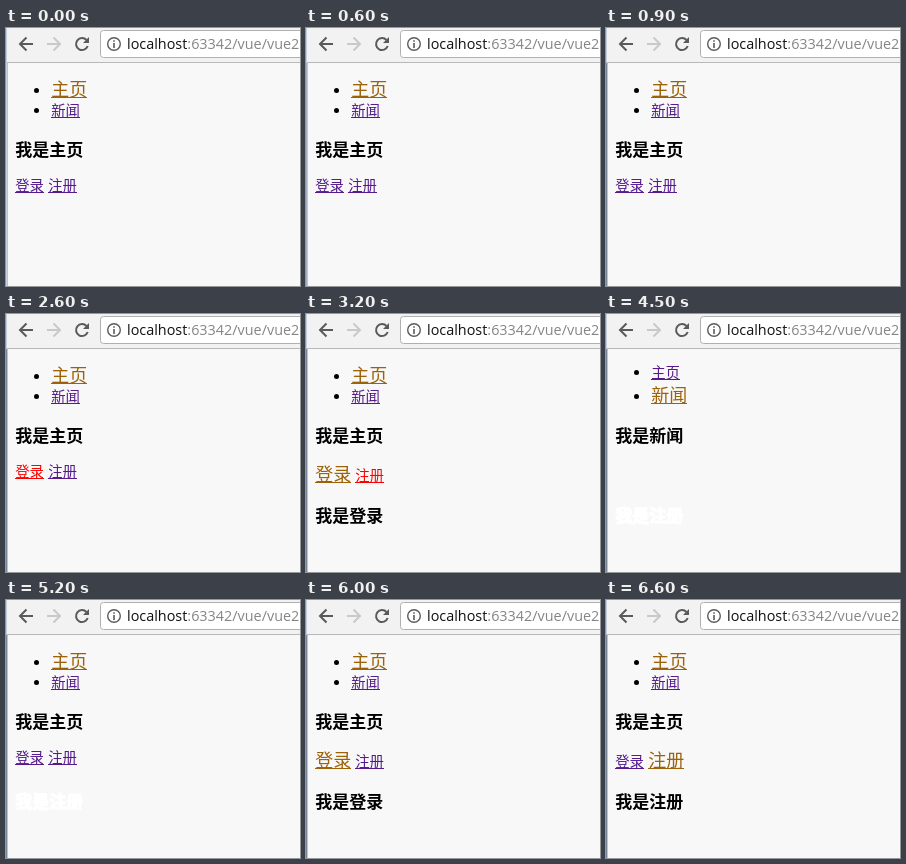
These frames come from a looping animation (294x258 px, 7.4 s). An HTML page:

```html
<!DOCTYPE html>
<html lang="zh-CN">
<head>
<meta charset="utf-8">
<title>主页</title>
<style>
  html, body { margin: 0; width: 100%; height: 100%; overflow: hidden; background: #f8f8f8; }
  svg { display: block; }
  text { font-family: "Noto Sans CJK SC", "Noto Sans CJK", sans-serif; }
  .url { font: 14.4px "Open Sans", "Noto Sans", sans-serif; fill: #858585; }
  .host { fill: #111; }
  .head { font-size: 17px; font-weight: 700; }
  .faded { fill: #fff; stroke: #fff; stroke-width: 1; }
  .icon { fill: none; stroke: #5a5a5a; stroke-width: 2; }
  .off { stroke: #c9c9c9; }
  .link { fill: #551a8b; font-size: 14.4px; font-weight: 350; }
  .hover { fill: #f00; }
  .active { fill: #9c6208; font-size: 18px; }
</style>
</head>
<body>
<svg width="294" height="258" viewBox="0 0 294 258">
  <rect width="294" height="258" fill="#f8f8f8"/>
  <rect width="294" height="34" fill="#f2f2f2"/>
  <rect y="34" width="294" height="1" fill="#b8b8b8"/>
  <rect width="1" height="258" fill="#c3cfdf"/>
  <rect x="1" y="35" width="1" height="223" fill="#c4c4c4"/>
  <rect id="edge" y="35" width="1" height="223" fill="#75869b"/>

  <path class="icon" d="M27 16H14.5M20.5 9.5L14 16L20.5 22.5"/>
  <path class="icon off" d="M41 16H53.5M47.5 9.5L54 16L47.5 22.5"/>
  <path class="icon" d="M80.5 12A6 6 0 1 0 81.7 18"/>
  <path d="M83 9V15H77Z" fill="#5a5a5a"/>

  <rect x="94.5" y="2.5" width="220" height="27" rx="3" fill="#fff" stroke="#b0b0b0"/>
  <circle cx="108" cy="16" r="6.3" fill="none" stroke="#5a5a5a" stroke-width="1.4"/>
  <path d="M107.2 12.2h1.6v1.6h-1.6zM107.2 15h1.6v5h-1.6z" fill="#5a5a5a"/>
  <text class="url" x="121" y="21"><tspan class="host">localhost</tspan>:63342/vue/vue2</text>

  <g id="page"></g>
</svg>
<script>
  const LOOP = 7400;
  const page = document.getElementById('page');
  const edge = document.getElementById('edge');

  // [start, main view, sub view, hovered link, faded heading]
  const states = [
    [0, '主页'],
    [2600, '主页', '', '登录'],
    [2700, '主页', '登录'],
    [3200, '主页', '登录', '注册'],
    [3400, '主页', '注册'],
    [4300, '主页', '注册', '新闻'],
    [4500, '新闻', '', '', '注册'],
    [5100, '新闻', '', '主页', '注册'],
    [5200, '主页', '', '', '注册'],
    [5800, '主页', '', '登录', '注册'],
    [6000, '主页', '登录'],
    [6500, '主页', '登录', '注册'],
    [6600, '主页', '注册']
  ];

  const heading = (y, name, extra = '') =>
    `<text class="head ${extra}" x="9.2" y="${y}">我是${name}</text>`;

  function link(x, y, name, on, hovered) {
    const kind = on ? 'active' : hovered ? 'hover' : '';
    const width = on ? 36 : 29;
    return `<g class="link ${kind}"><text x="${x}" y="${y}">${name}</text>` +
      `<rect x="${Math.floor(x)}" y="${y + 1}" width="${width}" height="1"/></g>`;
  }

  const bullet = baseline => `<circle cx="30.5" cy="${baseline - 5.5}" r="2.5"/>`;

  function draw([, main, sub, hovered, faded]) {
    const home = main === '主页';
    const top = home ? 68 : 64;
    let out = bullet(top) + bullet(88) +
      link(45.2, top, '主页', home, hovered === '主页') +
      link(45.2, 88, '新闻', !home, hovered === '新闻') +
      heading(128, main);
    if (home) {
      const y = sub ? 167 : 163;
      const login = sub === '登录';
      out += link(9.2, y, '登录', login, hovered === '登录') +
        link(login ? 49.2 : 42.2, y, '注册', sub === '注册', hovered === '注册');
    }
    if (sub) out += heading(208, sub);
    else if (faded) out += heading(208, faded, 'faded');
    page.innerHTML = out;
  }

  let shown;
  function frame() {
    const t = performance.now() % LOOP;
    const state = states.findLast(s => s[0] <= t);
    if (state !== shown) draw(shown = state);
    const step = Math.floor((t - 400) / 100);
    edge.setAttribute('opacity', Math.max(0, Math.min(5, step)) / 5);
    requestAnimationFrame(frame);
  }
  frame();
</script>
</body>
</html>
```
